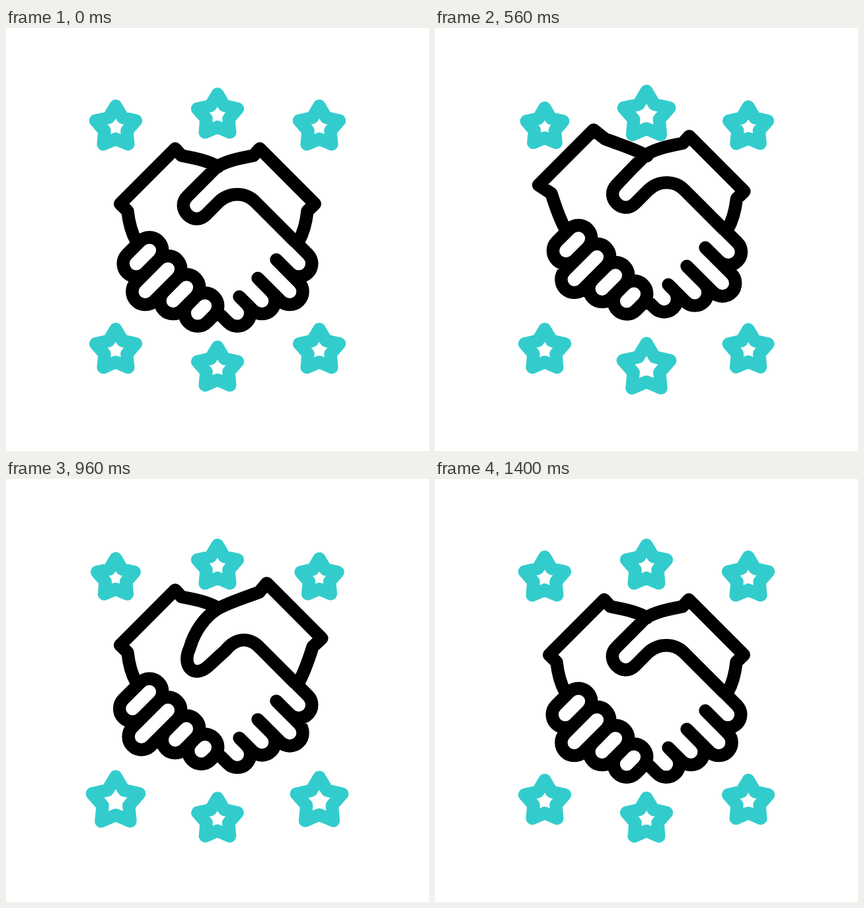
Write an HTML page that moves like this. It is 640 px wide and 640 px high and loops after 2020 ms.

```html
<!DOCTYPE html>
<html lang="en">
<head>
<meta charset="utf-8">
<title>Handshake</title>
<style>
  html, body { margin: 0; width: 100%; height: 100%; overflow: hidden; background: #fff; }
  svg { display: block; width: 100vw; height: 100vh; }
  path { fill: none; stroke-width: 19.4; stroke-linecap: round; stroke-linejoin: round; }
</style>
</head>
<body>
<svg viewBox="0 0 640 640">
  <path id="stars" stroke="#33cccc"/>
  <path id="hands" stroke="#000"/>
</svg>
<script>
const LOOP = 2020, STEP = 20, BEAT = 200, LAG = 100;
const SIZE = 640, MID = SIZE / 2;
const GAP = 28;        // finger spacing along each axis
const HALF = GAP / 2;  // finger centre to its side
const TIP = `A${HALF * Math.SQRT2} ${HALF * Math.SQRT2} 0 0 `;

const ease = k => (1 - Math.cos(Math.PI * k)) / 2;
const clamp = (v, lo, hi) => Math.min(Math.max(v, lo), hi);

// Eased track through values placed one beat apart
function track(t, start, values) {
  const pos = clamp((t - start) / BEAT, 0, values.length - 1);
  const i = Math.min(Math.floor(pos), values.length - 2);
  return values[i] + (values[i + 1] - values[i]) * ease(pos - i);
}

// Rises to 1 over 'up' ms, then falls back over 'down' ms
const swell = (t, start, up, down) =>
  ease(clamp((t - start) / up, 0, 1)) - ease(clamp((t - start - up) / down, 0, 1));

const pulse = (t, start) => track(t, start, [1, 0.9, 1.2, 0.9, 1]);
const wiggle = (t, start) => track(t, start, [0, -6, 7, 0]);
const shake = t => track(t, 0, [0, -26, 8, -21, 7.5, -17, 4, 0]);

const xy = (x, y) => `${x.toFixed(2)} ${y.toFixed(2)} `;

// Point (x, y) moved by (dx, dy) in proportion to k
const mover = k => (x, y, dx = 0, dy = 0) => xy(x + dx * k, y + dy * k);

function star(x, y, scale) {
  let d = "";
  for (let i = 0; i < 10; i++) {
    const r = (i % 2 ? 17.8 : 32) * scale, a = i * Math.PI / 5;
    d += (i ? "L" : "M") + xy(x + r * Math.sin(a), y - r * Math.cos(a));
  }
  return d + "Z";
}

// Column 0 is the middle, then right and left; each has a top and a bottom star
function stars(t) {
  let d = "";
  [0, 1, -1].forEach((side, col) => {
    const x = MID + side * 154, lift = side ? 0 : 1;
    const first = LAG * (1 + 2 * col), swap = side < 0 ? 0 : LAG;
    const top = side < 0 ? first - LAG : first;
    const bottom = side < 0 ? first + LAG : first + (side ? 2 : 1) * LAG;
    d += star(x, 150 - 18 * lift, pulse(t, top)) +
         star(x, 487.6 + 27 * lift, pulse(t, bottom));
  });
  return d;
}

// Cuff outline for the left (-1) or right (1) side
function cuff(side, k, spread) {
  const at = mover(k);
  const p = (x, y, dx = 0, dy = 0) => at(MID + side * x, y, side * dx, dy);
  return "M" + p(123, 322) +
    "C" + p(130, 310, 1, -2) + p(134, 295, 3, -4) + p(136, 277, 8.5, -9) +
    "L" + p(147.3, 266, spread, -10.7) +
    "L" + p(64, 182.5, spread, -10.7) +
    "L" + p(54.5, 193, 9, -7.5) +
    "C" + p(31, 197.5, 4.5, -1) + p(14, 201, 2, 1) + p(-1, 210, 0, 2);
}

function thumb(k) {
  const p = mover(k);
  return "M" + p(319, 210, 0, 2) +
    "C" + p(304, 225, -3, -2) + p(289, 240, -4, 5) + p(274.4, 254.6, 3.6, 17) +
    "C" + p(255.8, 273.2, 10, 25) + p(283.9, 301.3, 0, 16) + p(302.5, 282.6, 2.5, 17) +
    "L" + p(322, 263, 11, 11) +
    "C" + p(338, 248, 11, 6) + p(362, 248, 8, 6) + p(377, 263, 8, 8) +
    "L" + xy(437, 323);
}

// Both hands share one set of fingers; the left ones are mirrored and closed
function fingers(t, side) {
  const sweep = side > 0 ? 1 : 0;
  return [20, 34.3, 20.3, 11].map((length, i) => {
    const e = wiggle(t, (side > 0 ? 0 : 5 * LAG) + i * LAG);
    const p = (x, y) => xy(MID + side * (x - MID), y);
    const x = 409 - GAP * i, y = 350.5 + GAP * i, reach = length + e;
    const sides = "M" + p(x + GAP, y - GAP) +
      "L" + p(x + GAP + reach, y - GAP + reach) +
      TIP + sweep + " " + p(x + reach, y + reach) +
      "L" + p(x, y);
    return side > 0 ? sides : sides + TIP + sweep + " " + p(x + GAP, y - GAP) + "Z";
  }).join("");
}

function draw(t) {
  const right = swell(t, 500, 400, 450);
  const hands = document.getElementById("hands");
  document.getElementById("stars").setAttribute("d", stars(t));
  hands.setAttribute("transform", `translate(0 ${shake(t).toFixed(2)})`);
  hands.setAttribute("d",
    cuff(-1, swell(t, 0, 500, 400), 17) + cuff(1, right, 11) +
    thumb(right) + fingers(t, 1) + fingers(t, -1));
}

const begin = performance.now();
function tick() {
  const t = (performance.now() - begin) % LOOP;
  draw(Math.floor(t / STEP) * STEP);
  requestAnimationFrame(tick);
}
tick();
</script>
</body>
</html>
```
